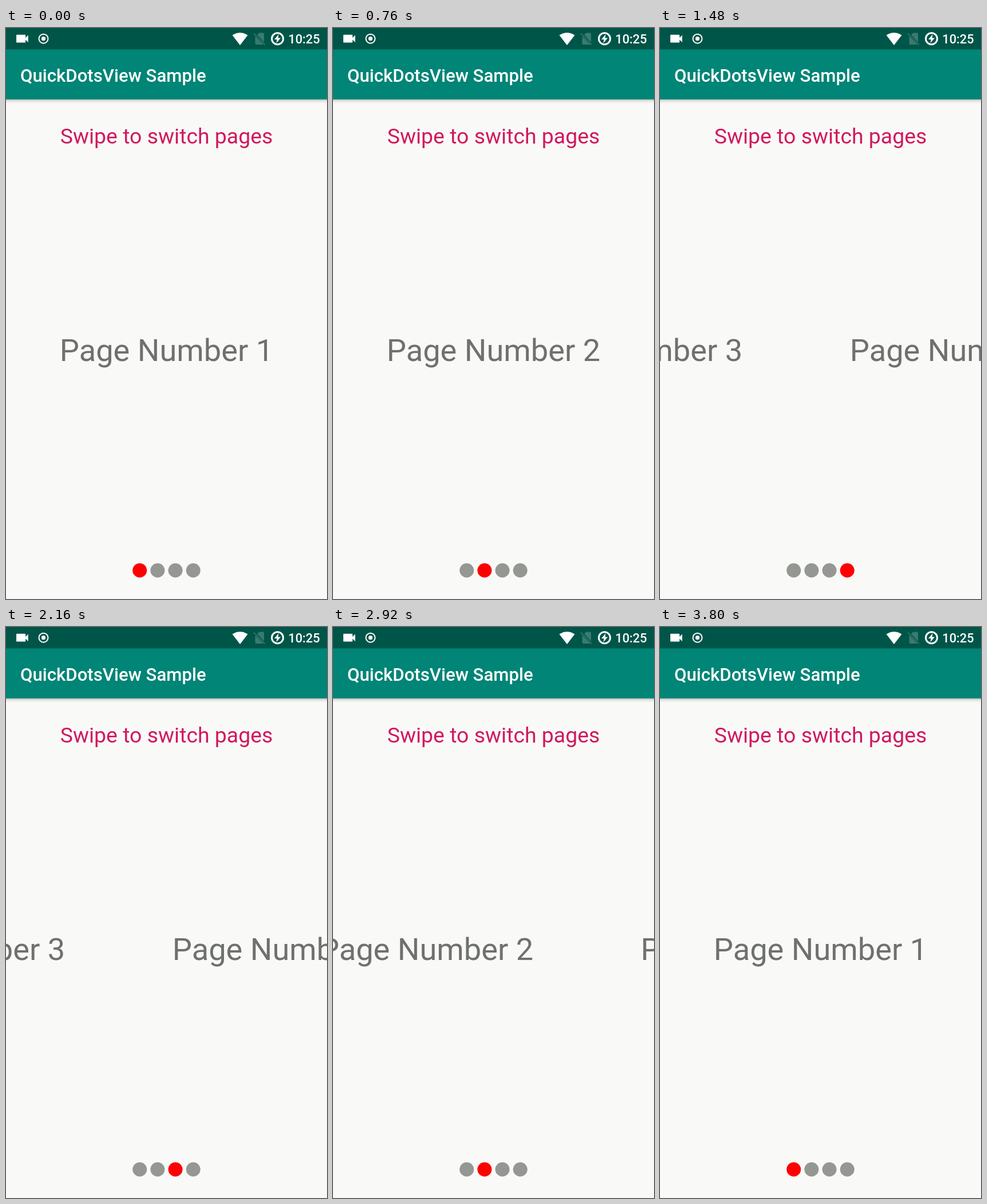
Write an HTML page that moves like this. It is 561 by 998 pixels and loops after 3.84 s.

```html
<!DOCTYPE html>
<html lang="en">
<head>
<meta charset="utf-8">
<title>QuickDotsView Sample</title>
<style>
  html, body { margin: 0; width: 100%; height: 100%; overflow: hidden; background: #f9faf8; }
  svg { display: block; width: 561px; height: 998px; font-family: Roboto, sans-serif; }
  .medium { font-weight: 500; fill: #fff; }
</style>
</head>
<body>
<svg viewBox="0 0 561 998">
  <defs>
    <linearGradient id="shadow" x2="0" y2="1">
      <stop offset="0" stop-opacity=".3"/>
      <stop offset=".4" stop-opacity=".1"/>
      <stop offset="1" stop-opacity="0"/>
    </linearGradient>
  </defs>
  <rect width="561" height="998" fill="#f9faf8"/>

  <!-- App bar -->
  <rect y="124" width="561" height="8" fill="url(#shadow)"/>
  <rect width="561" height="124.7" fill="#008576"/>
  <rect width="561" height="37.4" fill="#005549"/>
  <text class="medium" x="24.9" y="94" font-size="31.17">QuickDotsView Sample</text>

  <!-- Status icons -->
  <g fill="#fff">
    <path transform="translate(14.6 4.9) scale(1.15)" d="M17 10.5V7c0-.55-.45-1-1-1H4c-.55 0-1 .45-1 1v10c0 .55.45 1 1 1h12c.55 0 1-.45 1-1v-3.5l4 4v-11l-4 4z"/>
    <circle cx="65.5" cy="18.7" r="8" fill="none" stroke="#fff" stroke-width="2"/>
    <circle cx="65.5" cy="18.7" r="3.6"/>
    <path d="M409 30L395.5 12.5Q409 4 422.5 12.5Z"/>
    <g fill="#3a7a70">
      <path d="M439 12l3.5-3.5H449q2 0 2 2V25Z"/>
      <path d="M435.500 14.500L450 29H437.500q-2 0-2-2Z"/>
      <path d="M433 9.500L452.500 29.500" stroke="#3a7a70" stroke-width="1.600"/>
    </g>
    <circle cx="474.5" cy="18.7" r="10" fill="none" stroke="#fff" stroke-width="3"/>
    <path d="M476.500 11L469 20H473.500L472.500 26.500L480 17.500H475.500Z"/>
  </g>
  <text class="medium" x="493.300" y="27" font-size="21.8">10:25</text>

  <!-- Content -->
  <text x="280.5" y="202.2" font-size="37.4" text-anchor="middle" fill="#d2185d">Swipe to switch pages</text>
  <g id="pages" font-size="54.2" text-anchor="middle" fill="#6f716f"></g>
  <g id="dots"></g>
</svg>
<script>
  const LOOP = 3840, STEP = 40, WIDTH = 561, PAGES = 4;
  const DRAG = 130, SETTLE = 400, DRAGGED = 0.3;
  // Moments when the finger lets go: three swipes forward, three back
  const releases = [265, 888, 1442, 2154, 2834, 3425];

  const pages = document.getElementById('pages');
  const dots = document.getElementById('dots');

  function add(parent, tag, attrs, text = '') {
    const node = document.createElementNS('http://www.w3.org/2000/svg', tag);
    for (const name in attrs) node.setAttribute(name, attrs[name]);
    node.textContent = text;
    parent.append(node);
  }

  for (let i = 0; i < PAGES; i++) {
    add(pages, 'text', { x: (i + 0.5) * WIDTH, y: 582 }, `Page Number ${i + 1}`);
    add(dots, 'circle', { cx: 233.7 + i * 31.17, cy: 948, r: 12.5 });
  }

  // Accelerating drag, then a quintic ease-out to the next page
  function swipe(sinceRelease) {
    if (sinceRelease < 0) return DRAGGED * Math.max(0, 1 + sinceRelease / DRAG) ** 2;
    return 1 - (1 - DRAGGED) * Math.max(0, 1 - sinceRelease / SETTLE) ** 5;
  }

  function draw(now) {
    const time = Math.floor((now % LOOP) / STEP) * STEP;
    let position = 0, selected = 0;
    releases.forEach((release, i) => {
      const direction = i < 3 ? 1 : -1;
      position += direction * swipe(time - release);
      if (time >= release) selected += direction;
    });
    pages.setAttribute('transform', `translate(${-Math.round(position * WIDTH)} 0)`);
    [...dots.children].forEach((dot, i) =>
      dot.setAttribute('fill', i === selected ? '#ff0000' : '#959793'));
    requestAnimationFrame(draw);
  }
  draw(0);
</script>
</body>
</html>
```
